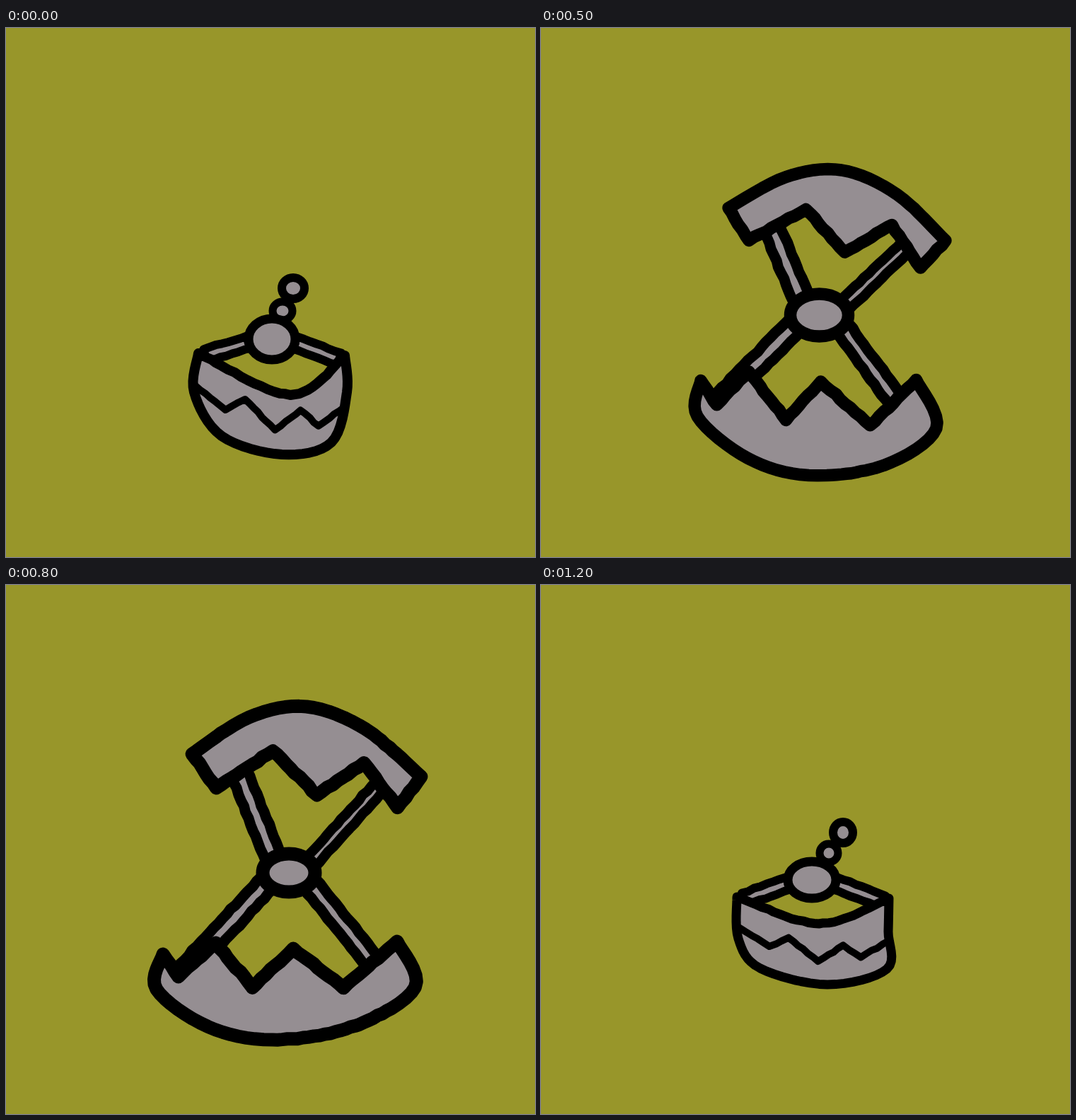
These frames come from a looping animation (748x748 px, 1300 ms). An HTML page with a canvas:

```html
<!DOCTYPE html>
<html lang="en">
<head>
<meta charset="utf-8">
<title>Snapping trap</title>
<style>
html, body { margin: 0; width: 100%; height: 100%; overflow: hidden; background: #98962a; }
canvas { display: block; width: 748px; height: 748px; }
</style>
</head>
<body>
<canvas id="stage" width="748" height="748"></canvas>
<script>
const BG = '#98962a', METAL = '#958e92', INK = '#000';
const SIZE = 748, STEP = 100;
const ctx = document.getElementById('stage').getContext('2d');
ctx.lineJoin = ctx.lineCap = 'round';

// Geometry helpers
const lerp = (a, b, k) => a + (b - a) * k;
const between = (p, q, k) => [lerp(p[0], q[0], k), lerp(p[1], q[1], k)];

function mix(a, b, k = 0.5) {
  if (typeof a === 'number') return lerp(a, b, k);
  if (Array.isArray(a)) return a.map((v, i) => mix(v, b[i], k));
  return Object.fromEntries(Object.keys(a).map(key => [key, mix(a[key], b[key], k)]));
}

// Catmull-Rom curve through a few points.
function curve(pts, parts = 8) {
  const out = [pts[0]];
  for (let i = 0; i < pts.length - 1; i++) {
    const p = pts[i], q = pts[i + 1];
    const before = pts[i - 1] || p, after = pts[i + 2] || q;
    for (let n = 1; n <= parts; n++) {
      const t = n / parts, u = t * t, c = u * t;
      out.push([0, 1].map(d => 0.5 * (2 * p[d] + (q[d] - before[d]) * t
        + (2 * before[d] - 5 * p[d] + 4 * q[d] - after[d]) * u
        + (3 * p[d] - before[d] - 3 * q[d] + after[d]) * c)));
    }
  }
  return out;
}

// Affine map that carries three anchor points onto three others.
function carry([o, p, q], [o2, p2, q2]) {
  const ux = p[0] - o[0], uy = p[1] - o[1], vx = q[0] - o[0], vy = q[1] - o[1];
  const det = ux * vy - uy * vx;
  return ([x, y]) => {
    const dx = x - o[0], dy = y - o[1];
    const a = (dx * vy - dy * vx) / det, b = (ux * dy - uy * dx) / det;
    return [0, 1].map(d => o2[d] + a * (p2[d] - o2[d]) + b * (q2[d] - o2[d]));
  };
}

// Drawing helpers
const wobble = n => {
  const s = Math.sin(n * 12.9898) * 43758.5453;
  return (s - Math.floor(s) - 0.5) * 1.8;
};

function draw(pts, width, closed = true) {
  const path = new Path2D(), ring = closed ? [...pts, pts[0]] : pts;
  path.moveTo(...ring[0]);
  for (let i = 1; i < ring.length; i++) {
    const p = ring[i - 1], q = ring[i];
    const bits = Math.max(1, Math.round(Math.hypot(q[0] - p[0], q[1] - p[1]) / 9));
    for (let b = 1; b < bits; b++) {
      const [x, y] = between(p, q, b / bits);
      path.lineTo(x + wobble(x), y + wobble(y));
    }
    path.lineTo(...q);
  }
  if (closed) {
    path.closePath();
    ctx.fill(path);
  }
  ctx.lineWidth = width;
  ctx.stroke(path);
}

function oval([cx, cy, rx, ry], width) {
  ctx.beginPath();
  ctx.ellipse(cx, cy, rx, ry, 0, 0, Math.PI * 2);
  ctx.fill();
  ctx.lineWidth = width;
  ctx.stroke();
}

// Flat bar from the rim of the hub to a point.
function arm([cx, cy, rx, ry], end, half, width) {
  const angle = Math.atan2((end[1] - cy) / ry, 2 * (end[0] - cx) / rx);
  const root = [cx + rx * Math.cos(angle), cy + ry * Math.sin(angle)];
  const dx = end[0] - root[0], dy = end[1] - root[1], len = Math.hypot(dx, dy);
  const nx = -dy / len * half, ny = dx / len * half;
  const side = ([x, y], s) => [x + s * nx, y + s * ny];
  draw([side(root, 1), side(end, 1), side(end, -1), side(root, -1)], width);
}

// Open trap: each jaw is one shape, placed by its left tip, middle and right tip.
const UPPER = {
  back: [[247, 239], [338, 179], [425, 158], [510, 186], [585, 251]],
  teeth: [[545, 299], [502, 236], [427, 288], [368, 227], [278, 287]]
};
const LOWER = {
  back: [[224, 540], [214, 592], [285, 643], [375, 657], [490, 630], [575, 568], [551, 502]],
  teeth: [[475, 575], [406, 521], [348, 582], [298, 519], [245, 572]]
};
const anchors = ({ back }) => [back[0], back[back.length >> 1], back[back.length - 1]];

function place(jaw, spot) {
  const move = carry(anchors(jaw), spot);
  return { back: curve(jaw.back.map(move)), teeth: jaw.teeth.map(move), tip: spot[2] };
}

function drawOpen({ hub, up, low, line }) {
  const top = place(UPPER, up), base = place(LOWER, low);
  arm(hub, between(top.teeth[4], top.teeth[3], 0.4), 12, 15);
  arm(hub, between(top.teeth[0], top.teeth[1], 0.5), 9, 14);
  arm(hub, between(base.teeth[4], base.teeth[3], 0.2), 12, 15);
  arm(hub, between(base.teeth[0], base.tip, 0.55), 11, 15);
  oval(hub, line);
  for (const jaw of [top, base]) draw([...jaw.back, ...jaw.teeth], line);
}

const stretch = ({ hub, up, low, line }, [cx, cy], sx, sy) => {
  const move = ([x, y]) => [cx + (x - cx) * sx, cy + (y - cy) * sy];
  return { hub: [...move(hub), hub[2], hub[3]], up: up.map(move), low: low.map(move), line };
};

const rising = {
  hub: [387, 407, 38, 30], line: 17,
  up: [[283, 270], [425, 244], [559, 350]],
  low: [[228, 457], [382, 608], [510, 493]]
};
const wide = { hub: [400, 405, 44, 30], line: 18, up: anchors(UPPER), low: anchors(LOWER) };
const falling = {
  hub: [400, 407, 37, 27], line: 19,
  up: [[263, 239], [425, 172], [587, 271]],
  low: [[222, 522], [377, 643], [553, 504]]
};

// Shut trap: rim and base are curves; the seam is a fixed zigzag of varying depth.
const SEAM = [[0, 0], [0.2, 0.6], [0.33, 0.2], [0.53, 1], [0.7, 0.3], [0.82, 0.7], [1, 0]];

function drawShut({ rim, base, seam, depth, hub, bead, ball, line }) {
  const left = rim[0], right = rim[rim.length - 1];
  arm(hub, [left[0] + 10, left[1] + 3], 9, 12);
  arm(hub, [right[0] - 8, right[1] + 5], 9, 12);
  oval(bead, 11);
  oval(ball, 12);
  const front = curve(rim), under = curve([right, ...base, left]);
  draw([...front, ...under.slice(1, -1)], line);
  draw(SEAM.map(([k, drop]) => {
    const [x, y] = between(...seam, k);
    return [x, y + drop * depth];
  }), 10, false);
  oval(hub, 13);
}

const rest = {
  rim: [[272, 460], [402, 519], [479, 463]],
  base: [[482, 515], [460, 586], [390, 603], [305, 577], [266, 515]],
  seam: [[268, 506], [480, 535]], depth: 47, line: 14,
  hub: [376, 440, 33, 29], bead: [391, 400, 14, 13], ball: [406, 368, 16, 15]
};
const squat = {
  rim: [[264, 464], [395, 519], [497, 482]],
  base: [[501, 525], [503, 571], [395, 609], [265, 575], [244, 535]],
  seam: [[250, 515], [502, 548]], depth: 50, line: 16,
  hub: [376, 448, 34, 25], bead: [391, 412, 19, 9], ball: [395, 388, 16, 13]
};
const landed = {
  rim: [[272, 450], [380, 434], [493, 396]],
  base: [[547, 478], [480, 528], [370, 560], [252, 547], [250, 505]],
  seam: [[265, 480], [520, 440]], depth: 40, line: 18,
  hub: [395, 392, 33, 21], bead: [400, 356, 15, 10], ball: [395, 335, 12, 11]
};
const settled = {
  rim: [[277, 441], [393, 479], [492, 443]],
  base: [[491, 490], [489, 543], [405, 565], [310, 542], [279, 500]],
  seam: [[281, 485], [490, 504]], depth: 37, line: 13,
  hub: [383, 417, 34, 26], bead: [407, 379, 13, 13], ball: [427, 350, 14, 15]
};

const cycle = [
  rest, mix(rest, squat), squat,
  stretch(rising, [325, 612], 0.88, 0.78), rising, mix(rising, wide), wide,
  stretch(wide, [427, 414], 1.126, 1.133), falling, stretch(falling, [400, 405], 0.92, 0.7),
  landed, mix(landed, settled), settled
];

const start = performance.now();

function tick() {
  const p = cycle[Math.floor((performance.now() - start) / STEP) % cycle.length];
  ctx.fillStyle = BG;
  ctx.fillRect(0, 0, SIZE, SIZE);
  ctx.fillStyle = METAL;
  ctx.strokeStyle = INK;
  (p.rim ? drawShut : drawOpen)(p);
  requestAnimationFrame(tick);
}
tick();
</script>
</body>
</html>
```
